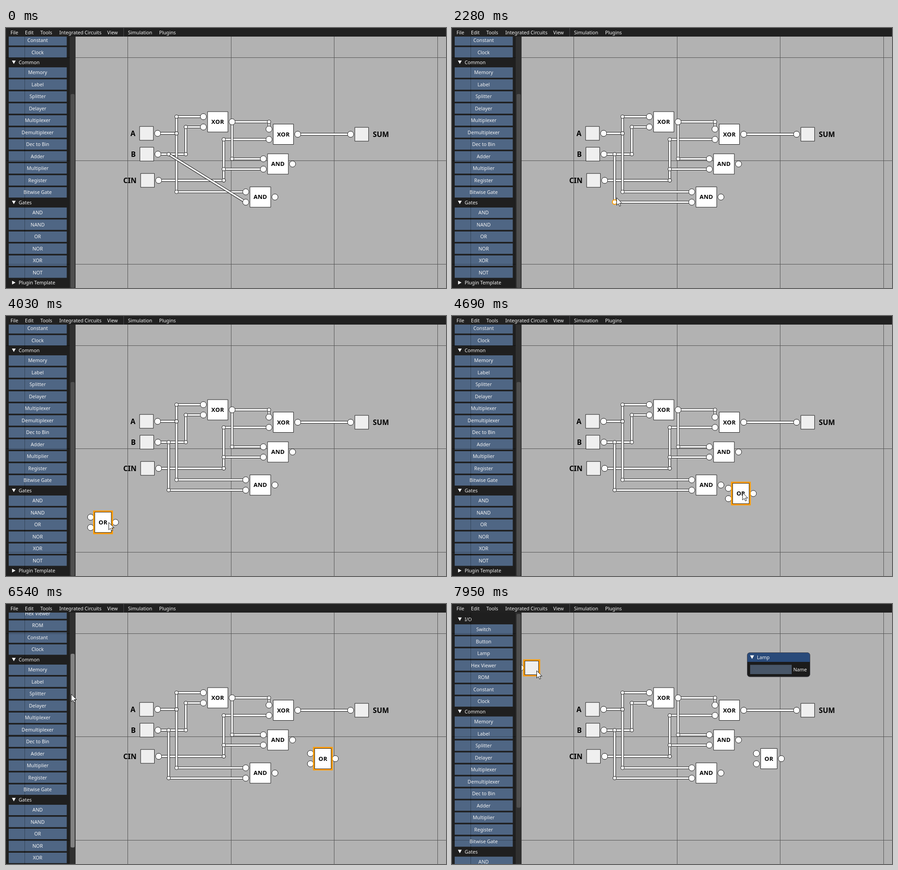
Animation of 974 by 575 pixels, one loop 8000 ms. Source, as an HTML page with a canvas:

```html
<!DOCTYPE html>
<html lang="en">
<head>
<meta charset="utf-8">
<title>Full adder editor</title>
<style>
html, body { margin: 0; width: 100%; height: 100%; overflow: hidden; background: #b2b2b2; }
canvas { display: block; }
</style>
</head>
<body>
<canvas id="stage" width="974" height="575"></canvas>
<script>
const ctx = document.getElementById('stage').getContext('2d');
const FONT = '"Noto Sans", "Open Sans", sans-serif';
const ORANGE = '#ff9d00', INK = '#1c1c1c';
const LOOP = 8000, STEP = 109.1, MAX_SCROLL = 161.7, THUMB_TRAVEL = 124;
const GRID = 228.5, GATE_H = 45, IO_SIZE = 30.5;

// Steps at which the user acts
const PICK_WIRE = 8, SPLIT = 12, GRAB_OR = 34, DROP_OR = 48, GRAB_BAR = 58, DROP_BAR = 65, GRAB_LAMP = 71;
const LAG = 0.16; // dragged parts trail the pointer by this many steps

// Pointer path: [step, x, y]
const path = [
  [0, 540, 537], [7, 437, 317], [13, 437, 317], [20, 364, 375], [24, 364, 375],
  [32, 72, 460], [GRAB_OR, 75, 460], [36, 227, 456], [41, 623, 406], [45, 701.5, 342], [49, 701.5, 342],
  [52, 348, 302], [57, 144, 235], [GRAB_BAR, 144, 235], [59, 144, 199], [DROP_BAR, 145, 88],
  [69, 80, 107], [70, 80, 107], [GRAB_LAMP, 121, 111], [72, 187, 147]];

function pointerAt(k) {
  const i = Math.max(1, path.findIndex(p => p[0] >= k));
  const [k0, x0, y0] = path[i - 1], [k1, x1, y1] = path[i];
  const u = Math.max(0, (k - k0) / (k1 - k0));
  return [x0 + (x1 - x0) * u, y0 + (y1 - y0) * u];
}

const gate = (name, x, y, w) => ({
  name, x, y, w, h: GATE_H, fill: '#fff',
  a: [x - w / 2 - 9.3, y - 11.4], b: [x - w / 2 - 9.3, y + 11.4], out: [x + w / 2 + 9.3, y]
});
// side is 1 for inputs of the circuit and -1 for lamps
const io = (label, x, y, side) => ({
  label, x, y, side, w: IO_SIZE, h: IO_SIZE, fill: '#efefef', out: [x + side * 24.6, y]
});

const inA = io('A', 311, 233, 1), inB = io('B', 311.7, 279, 1), cin = io('CIN', 313.3, 337, 1);
const sum = io('SUM', 787.4, 235, -1);
const xor1 = gate('XOR', 468.7, 207.5, 45), xor2 = gate('XOR', 614, 235, 45);
const and1 = gate('AND', 602, 300.7, 46), and2 = gate('AND', 563, 373.8, 46);
const parts = [inA, inB, cin, sum, xor1, xor2, and1, and2];

// Each wire runs level from one pin, turns at the given x, then runs level to the other
const routes = [
  [inB.out, xor1.b, 398], [cin.out, xor2.b, 482], [cin.out, and1.b, 482],
  [inA.out, and2.a, 377.5], [inA.out, xor1.a, 377.5],
  [xor1.out, xor2.a, xor2.a[0]], [xor1.out, and1.a, xor1.out[0]], [xor2.out, sum.out, sum.out[0]]
].map(([from, to, x]) => [from, [x, from[1]], [x, to[1]], to]);
const tap = [360, 279];

const menu = [['File', 10], ['Edit', 42], ['Tools', 76], ['Integrated Circuits', 118],
  ['View', 224], ['Simulation', 270], ['Plugins', 339]];
const sections = [
  ['I/O', 'Switch,Button,Lamp,Hex Viewer,ROM,Constant,Clock'],
  ['Common', 'Memory,Label,Splitter,Delayer,Multiplexer,Demultiplexer,Dec to Bin,Adder,Multiplier,Register,Bitwise Gate'],
  ['Gates', 'AND,NAND,OR,NOR,XOR,NOT'],
  ['Plugin Template', '']];

function rect(x, y, w, h, fill, r = 0) {
  ctx.fillStyle = fill;
  ctx.beginPath();
  ctx.roundRect(x, y, w, h, r);
  ctx.fill();
}

function stroke(color, width = 1) {
  ctx.lineWidth = width;
  ctx.strokeStyle = color;
  ctx.stroke();
}

function text(s, x, y, { size = 10.7, color = '#f4f4f4', align = 'left', weight = 400 } = {}) {
  ctx.font = `${weight} ${size}px ${FONT}`;
  ctx.fillStyle = color;
  ctx.textAlign = align;
  ctx.fillText(s, x, y + size * 0.36);
}

function trace(points) {
  ctx.beginPath();
  points.forEach(p => ctx.lineTo(...p));
}

function wire(points, edge = INK) {
  trace(points);
  stroke(edge, 5.8);
  stroke('#fafafa', 3.8);
}

function disc([x, y], r, edge = INK, width = 1) {
  ctx.beginPath();
  ctx.arc(x, y, r, 0, 7);
  ctx.fillStyle = '#fcfcfc';
  ctx.fill();
  stroke(edge, width);
}

function triangle(x, y, r, down) {
  const tips = [[-r, -r * 0.9], [r, -r * 0.9], [0, r * 0.9]];
  trace(tips.map(([u, v]) => down ? [x + u, y + v] : [x + v, y + u]));
  ctx.fillStyle = '#fff';
  ctx.fill();
}

function drawPart(p, selected) {
  const { x, y, w, h } = p;
  [p.a, p.b, p.out].forEach(pin => pin && disc(pin, 6.8));
  if (selected) rect(x - w / 2 - 3.6, y - h / 2 - 3.6, w + 7.2, h + 7.2, ORANGE);
  rect(x - w / 2, y - h / 2, w, h, p.fill);
  stroke(INK);
  const bold = { color: '#000', weight: 700 };
  if (p.name) {
    ctx.letterSpacing = '0.3px';
    text(p.name, x, y, { ...bold, size: 13, align: 'center' });
    ctx.letterSpacing = '0px';
  } else if (p.label) {
    text(p.label, x - p.side * 24.5, y, { ...bold, size: 15.9, align: p.side > 0 ? 'right' : 'left' });
  }
}

function grid(width, color) {
  ctx.fillStyle = color;
  for (let x = 41; x < width; x += GRID) ctx.fillRect(Math.round(x - 0.1), 19, 1, 556);
  for (let y = 65; y < 575; y += GRID) ctx.fillRect(0, Math.floor(y), width, 1);
}

function circuit(k) {
  rect(0, 0, 974, 575, '#b2b2b2');
  grid(974, '#555');
  routes.forEach(r => wire(r));
  const split = k >= SPLIT;
  const [px, py] = pointerAt(Math.min(k, 20));
  const joint = [px - 4, py + 10];
  wire(split ? [tap, joint, and2.b] : [tap, and2.b], !split && k >= PICK_WIRE ? ORANGE : INK);
  [tap, ...routes.flatMap(r => r.slice(1, 3))].forEach(p => disc(p, 4));
  if (split) disc(joint, ...(k < GRAB_OR ? [5, ORANGE, 2] : [4]));
  parts.forEach(p => drawPart(p));
  if (k >= GRAB_OR) drawPart(gate('OR', ...pointerAt(Math.min(k, DROP_OR) - LAG), 36.5), k < GRAB_LAMP);
  if (k >= GRAB_LAMP) drawPart(io('', ...pointerAt(k - LAG), -1), true);
}

function sidebar(k, cx, cy) {
  const barY = pointerAt(Math.min(k, DROP_BAR))[1];
  const shift = k < GRAB_BAR ? 0 : Math.min(THUMB_TRAVEL, 235 - barY);
  const top = 146 - shift;
  const onBar = k >= GRAB_BAR && k < DROP_BAR;
  const dragging = onBar || k >= GRAB_OR && k <= DROP_OR || k >= GRAB_LAMP;
  ctx.save();
  ctx.beginPath();
  ctx.rect(0, 19, 154, 556);
  ctx.clip();
  rect(0, 19, 154, 556, 'rgba(24,24,24,.95)');
  const labels = [];
  let y = 34 - MAX_SCROLL * (1 - shift / THUMB_TRAVEL);
  for (const [name, list] of sections) {
    triangle(17.3, y - 0.4, 4.2, list);
    text(name, 28, y);
    y += 22.4;
    for (const item of list ? list.split(',') : []) {
      const hover = k >= 0 && !dragging && cx > 6 && cx < 134 && Math.abs(cy - y) < 11.5;
      rect(6, y - 11.5, 128.5, 23, hover ? '#5a83b8' : '#4f6684');
      labels.push([item, y]);
      y += 26.5;
    }
    y -= 4;
  }
  grid(141, 'rgba(0,0,0,.32)');
  labels.forEach(([item, ly]) => text(item, 70, ly, { align: 'center' }));
  rect(141, 19, 13, 556, '#303030');
  const over = k >= 0 && cx >= 141 && cx <= 154 && cy > top && cy < top + 428;
  rect(143, top, 9, 428.5, onBar ? '#828282' : over ? '#696969' : '#4f4f4f', 3);
  ctx.restore();
}

function menuBar() {
  rect(0, 0, 974, 19, '#212121');
  menu.forEach(([name, x]) => text(name, x, 9.7));
  rect(260, 0, 1, 19, '#4a4a4e');
}

function lampPanel(x, y, w, h) {
  rect(x, y, w, h, '#1b1b1b', 6);
  rect(x, y, w, 20.5, '#294a7a', [6, 6, 0, 0]);
  ctx.beginPath();
  ctx.roundRect(x, y, w, h, 6);
  stroke('#484850');
  triangle(x + 10.7, y + 10, 4.5, true);
  text('Lamp', x + 21.5, y + 10.5);
  rect(x + 6.5, y + 27, 92, 20.5, '#485668');
  text('Name', x + 102, y + 37.5);
}

function pointer(x, y) {
  ctx.save();
  ctx.translate(x + 0.5, y + 0.5);
  const arrow = new Path2D('M0 0V16.5L3.8 13 6.3 18.6 9 17.4 6.5 12H11.7Z');
  ctx.fillStyle = '#fff';
  ctx.fill(arrow);
  ctx.lineWidth = 1;
  ctx.strokeStyle = '#111';
  ctx.stroke(arrow);
  ctx.restore();
}

function draw(t) {
  const k = Math.floor((t - 90) / STEP);
  const [cx, cy] = pointerAt(k);
  circuit(k);
  sidebar(k, cx, cy);
  menuBar();
  if (k >= GRAB_LAMP) lampPanel(653.5, 107.5, 139, 53.5);
  if (k >= 0) pointer(cx, cy);
}

const start = performance.now();
function tick() {
  draw((performance.now() - start) % LOOP);
  requestAnimationFrame(tick);
}
tick();
</script>
</body>
</html>
```
